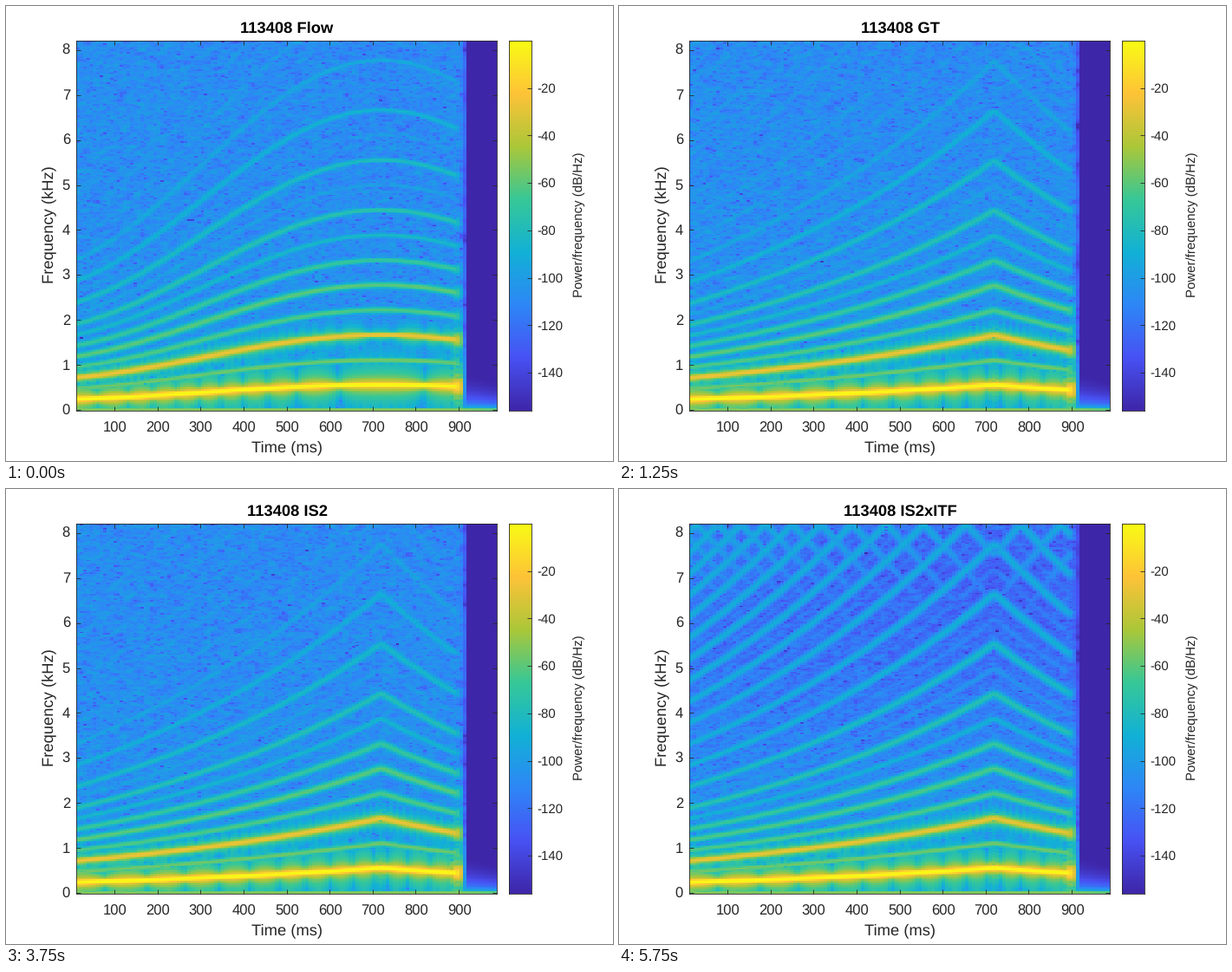
These frames come from a looping animation (700 px wide and 525 px high, 6.25 s). A matplotlib script:

```python
import numpy as np
import matplotlib.pyplot as plt
from matplotlib.animation import FuncAnimation
from matplotlib.colors import LinearSegmentedColormap

W, H = 700, 525
LEFT, RIGHT, TOP, BOTTOM = 81, 566, 40, 467
FS, N, WIN, HOP = 16384, 16384, 512, 128
T_PEAK, T_END, T_QUIET = 0.72, 0.9, 0.905
DB_MIN = -156
INK = "#262626"

plt.rcParams["font.family"] = "Liberation Sans"
plt.rcParams["axes.linewidth"] = 0.6
plt.rcParams["text.hinting"] = "none"

STOPS = "#3e26a8 #4852f4 #2e87f7 #12b1d6 #37c897 #abc739 #fec338 #f9fb15"
PARULA = LinearSegmentedColormap.from_list("parula", STOPS.split())

t = np.arange(N) / FS


def bend_pitch():
    """Exponential glide A#3 -> C#5 -> A4."""
    notes = np.log([233.08, 554.37, 440.0])
    return np.exp(np.interp(t, [0, T_PEAK, T_END], notes))


def smooth_pitch():
    """Rounded glide that peaks on C#5."""
    return 555.5 - 168 * (1 - np.cos(3.75 * (t - T_PEAK)))


def level(h, rich):
    """Peak density of harmonic h in dB/Hz."""
    if h % 2:
        floor = -114 if rich else -108
        return floor - (floor + 1) * np.exp(-((h - 1) / 4.7) ** 1.5)
    return max(-56 - 3 * (h - 2), -88 if rich else -100)


def noise(seed, rich):
    """Flat hiss, or hiss that falls with frequency."""
    rng = np.random.default_rng(seed)
    khz = np.fft.rfftfreq(N, 1 / FS) / 1000
    db = -101 - 25 * np.clip((khz - 1) / 6, 0, 1) if rich else -104 - 0.4 * khz
    spec = np.fft.rfft(rng.standard_normal(N)) * 10 ** (db / 20)
    return np.fft.irfft(spec, N) * np.sqrt(FS / 2)


def tones(pitch, rich, trim):
    phase = 2 * np.pi * np.cumsum(pitch) / FS
    total = np.zeros(N)
    for h in range(1, 41):
        over = np.maximum(h * pitch - FS / 2, 0) / 1000
        db = level(h, rich) - trim * (h > 6) - (14 if rich else 90) * over
        total += 10 ** ((db + 19.8) / 20) * np.sin(h * phase)
    fade = np.clip((T_END - t) / 0.008, 0, 1)
    return total * np.sin(np.pi / 2 * fade) ** 2


def spectrogram(pitch, rich, seed, trim=0):
    hum = 0.016 * np.exp(-np.maximum(t - T_END, 0) / 0.1)
    sig = tones(pitch, rich, trim) + noise(seed, rich) * (t < T_QUIET) + hum
    win = np.hanning(WIN)
    cols = [sig[k:k + WIN] * win for k in range(0, N - WIN + 1, HOP)]
    power = np.abs(np.fft.rfft(cols, axis=1)) ** 2 / (FS * np.sum(win ** 2))
    power[:, 1:-1] *= 2
    return 10 * np.log10(power.T + 1e-16)


bend = bend_pitch()
wide = spectrogram(bend, True, 5)
SCENES = [
    ("Flow", spectrogram(smooth_pitch(), False, 2)),
    ("GT", spectrogram(bend, False, 3)),
    ("IS", wide),
    ("IS2", spectrogram(bend, False, 4, trim=1.5)),
    ("IS2xITF", wide),
]

fig = plt.figure(figsize=(7, 5.25), dpi=100, facecolor="white")


def add_axes(x0, x1, extent, data):
    """Axes between two pixel columns, filled with a heat map."""
    ax = fig.add_axes([x0 / W, 1 - BOTTOM / H,
                       (x1 - x0) / W, (BOTTOM - TOP) / H])
    for spine in ax.spines.values():
        spine.set_color(INK)
    image = ax.imshow(data, cmap=PARULA, vmin=DB_MIN, vmax=0, extent=extent,
                      origin="lower", aspect="auto", interpolation="nearest")
    ax.tick_params(direction="in", length=3.5, width=0.6, color=INK,
                   labelbottom=False, labelleft=False, labelright=False)
    return ax, image


def label(x, y, s, px, color=INK, ha="center", **kw):
    return fig.text(x / W, 1 - y / H, s, fontsize=px * 0.72, color=color,
                    ha=ha, va="baseline", **kw)


def row(v, lo, hi):
    """Pixel row of value v on a vertical axis."""
    return BOTTOM - 0.5 - (BOTTOM - TOP) * (v - lo) / (hi - lo)


half_hop, half_bin = 500 * HOP / FS, FS / WIN / 2000
t0 = 500 * WIN / FS - half_hop
t1 = 1000 - t0
f0, f1 = -half_bin, FS / 2000 + half_bin
times, freqs, powers = range(100, 901, 100), range(9), range(-140, -19, 20)

ax, image = add_axes(LEFT, RIGHT, [t0, t1, f0, f1], SCENES[0][1])
ax.set_xticks(times)
ax.set_yticks(freqs)
ax.tick_params(top=True, right=True)

ramp = np.linspace(DB_MIN, 0, 256)[:, None]
bar, _ = add_axes(580, 606, [0, 1, DB_MIN, 0], ramp)
bar.set_xticks([])
bar.set_yticks(powers)
bar.tick_params(left=False, right=True)

for ms in times:
    x = LEFT + 0.5 + (RIGHT - LEFT) * (ms - t0) / (t1 - t0)
    label(x, 491.5, str(ms), 16.67)
for khz in freqs:
    label(74, row(khz, f0, f1) + 6, str(khz), 16.67, ha="right")
for db in powers:
    label(612, row(db, DB_MIN, 0) + 5.5, str(db), 15, ha="left")

side = dict(rotation=90, rotation_mode="anchor")
label(324, 514.5, "Time (ms)", 18.33)
label(54, 252.5, "Frequency (kHz)", 18.33, **side)
label(665, 252, "Power/frequency (dB/Hz)", 15, **side)
title = label(324, 31, "", 18.33, color="black", weight="bold")


def draw(i):
    name, data = SCENES[i % len(SCENES)]
    image.set_data(data)
    title.set_text("113408 " + name)
    return image, title


anim = FuncAnimation(fig, draw, frames=len(SCENES), interval=1250,
                     repeat=True, repeat_delay=0, blit=False)
plt.show()
```
